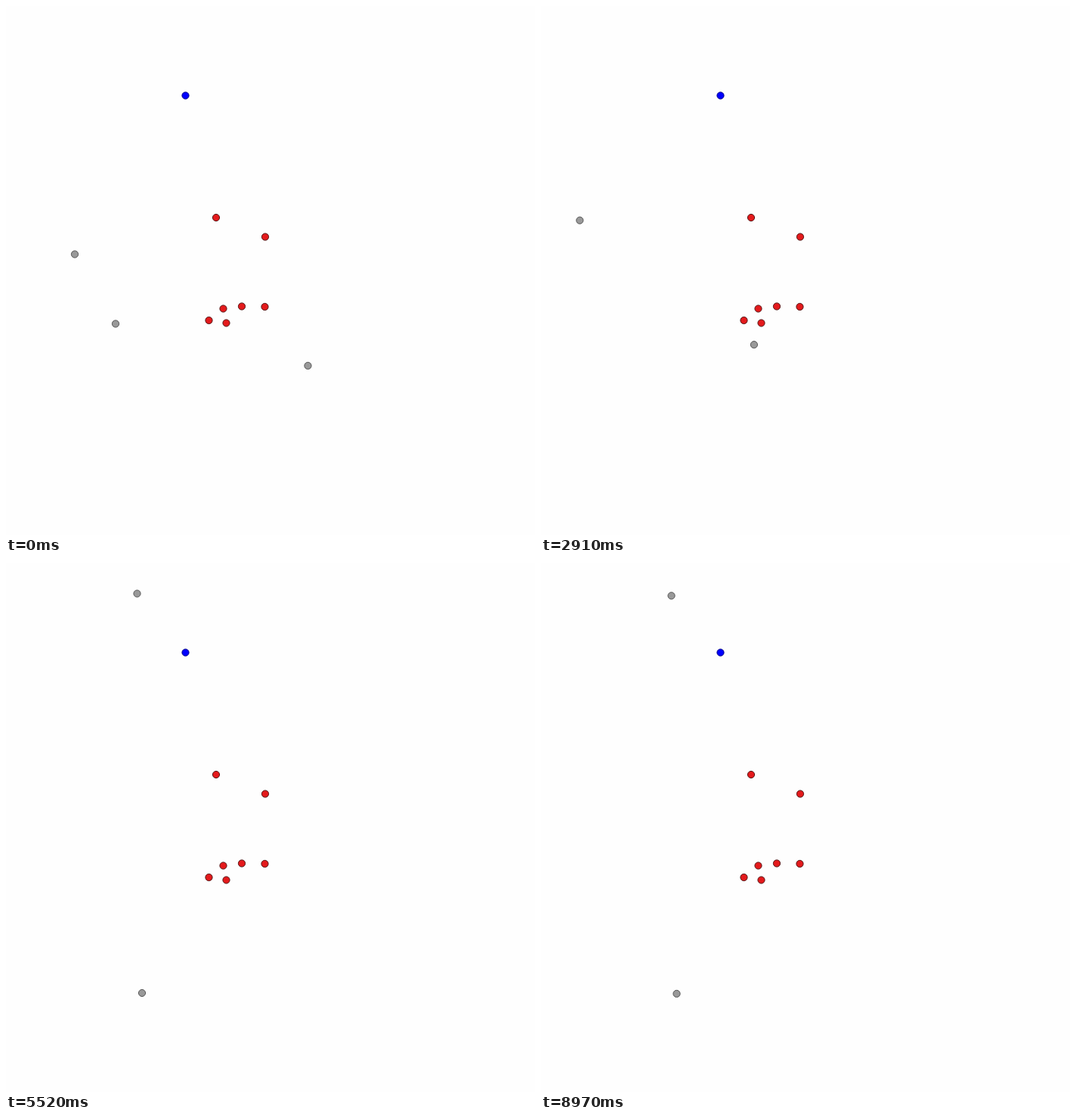
These frames come from a looping animation (700x700 px, 9 s). An HTML page with a canvas:

```html
<!DOCTYPE html>
<html lang="en">
<head>
<meta charset="utf-8">
<title>Moving dots</title>
<style>
  html, body { margin: 0; width: 100%; height: 100%; overflow: hidden; background: #fefefe; }
  canvas { display: block; }
</style>
</head>
<body>
<canvas id="stage" width="700" height="700"></canvas>
<script>
const ctx = document.getElementById('stage').getContext('2d');
const LOOP = 9000, STEP = 30, SETTLE = 1200;

const reds = [[278, 280], [343, 305.5], [312, 397.5], [342.5, 398],
  [287.5, 400.5], [268.5, 416], [291.5, 419.5]];

// The moving dots pass their key points at these times, then settle at rest
const times = [0, 930, 1230, 2040, 2790, 3810, 5520];
const movers = [
  { rest: [172.5, 43.5], keys: [[91, 328.5], [206, 262], [285, 216], [200, 34.5],
    [166, -6], [166, 25], [173.5, 40.5]] },
  { rest: [-70, 450], keys: [[145, 420.5], [203.5, 355.5], [258, 289.5], [241, 200.5],
    [68, 271], [4, 383], [-70, 450]] },
  { rest: [179.5, 570], keys: [[399.5, 476], [316, 342], [298.5, 288], [319.5, 254.5],
    [289, 428], [217, 540], [180, 569]] }
];

// Smooth slope through neighbouring keys, zero at both ends
function slope(v, i) {
  if (i === 0 || i === v.length - 1) return 0;
  const h = times[i] - times[i - 1], k = times[i + 1] - times[i];
  return ((v[i] - v[i - 1]) / h * k + (v[i + 1] - v[i]) / k * h) / (h + k);
}

// Cubic curve through the values v, then an exponential approach to rest
function along(v, rest, t) {
  const last = v.length - 1;
  if (t >= times[last]) return rest + (v[last] - rest) * Math.exp((times[last] - t) / SETTLE);
  const i = times.findIndex(k => k > t) - 1;
  const h = times[i + 1] - times[i], u = (t - times[i]) / h;
  const w = u * u * (3 - 2 * u);
  return v[i] + (v[i + 1] - v[i]) * w +
    h * u * (1 - u) * ((1 - u) * slope(v, i) - u * slope(v, i + 1));
}

function dot([x, y], fill, stroke) {
  ctx.beginPath();
  ctx.arc(x, y, 4.6, 0, 2 * Math.PI);
  ctx.fillStyle = fill;
  ctx.fill();
  ctx.strokeStyle = stroke;
  ctx.stroke();
}

function draw(now) {
  const t = Math.floor(now % LOOP / STEP) * STEP;
  ctx.fillStyle = '#fefefe';
  ctx.fillRect(0, 0, 700, 700);
  reds.forEach(p => dot(p, '#e41a1c', '#521414'));
  dot([237.5, 118.5], '#0000ff', '#000084');
  for (const { keys, rest } of movers) {
    const place = [0, 1].map(axis => along(keys.map(p => p[axis]), rest[axis], t));
    dot(place, '#999999', '#555555');
  }
}

const start = performance.now();
function tick() {
  draw(performance.now() - start);
  requestAnimationFrame(tick);
}
tick();
</script>
</body>
</html>
```
